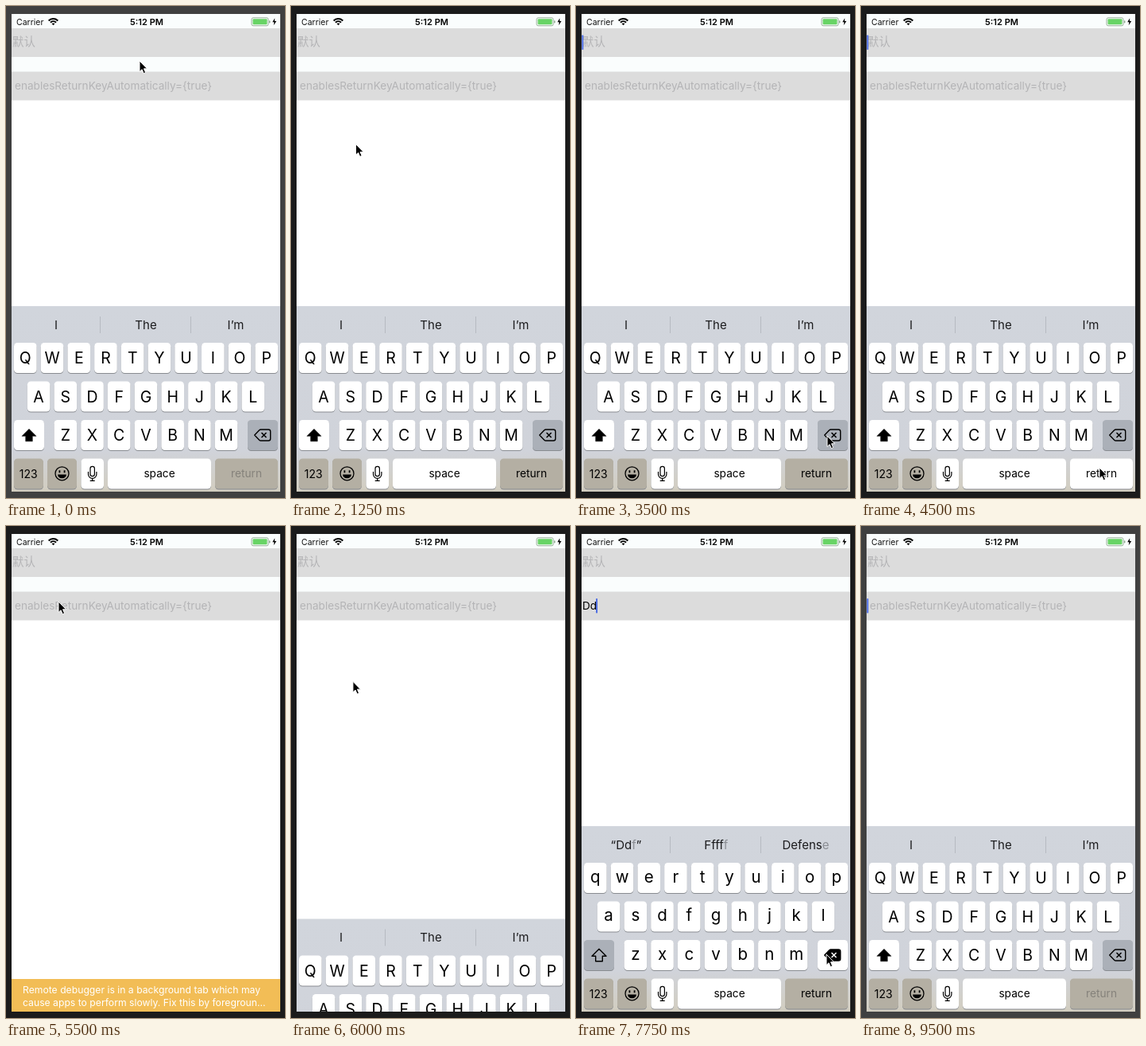
These frames come from a looping animation (351x618 px, 9750 ms). An HTML page with a canvas:

```html
<!DOCTYPE html>
<html>
<head>
<meta charset="utf-8">
<style>
html, body { margin: 0; width: 351px; height: 618px; overflow: hidden; }
canvas { display: block; }
</style>
</head>
<body>
<canvas id="stage" width="351" height="618"></canvas>
<script>
const ctx = document.getElementById('stage').getContext('2d');
const LOOP = 9750, STEP = 250, KEYBOARD_TOP = 377;
const FONT = "Inter, 'Noto Sans CJK SC', 'Noto Sans CJK JP', sans-serif";
const DEFAULT_WORDS = ['I', 'The', 'I’m'];

const initial = { active: false, focus: 2, text: '', press: '', words: DEFAULT_WORDS, fade: false };
const events = [
  [500, { active: true, focus: 1 }],
  [2500, { text: 'C' }],
  [2750, { words: ['“C”', 'Can', 'Come'] }],
  [3250, { text: '', press: 'delete', words: DEFAULT_WORDS }],
  [3500, { press: '' }],
  [4500, { press: 'return' }],
  [4750, { press: '', focus: 0 }],
  [5750, { focus: 2 }],
  [6750, { text: 'D' }],
  [7000, { words: ['“D”', 'Do', 'Don’t'] }],
  [7250, { text: 'Dd', words: ['“Dd”', 'Dad', 'Did'] }],
  [7500, { text: 'Ddf', words: ['“Ddf”', 'Fffff', 'Defense'] }],
  [7750, { text: 'Dd', press: 'delete', fade: true }],
  [8000, { text: 'D', words: ['“D”', 'Do', 'Don’t'], fade: false }],
  [8250, { text: '', words: DEFAULT_WORDS }],
  [8500, { press: '' }],
  [9250, { active: false }]
];

// Tracks hold [time, ...values].
const pointerTrack = [
  [0, 168, 69], [500, 60, 46], [1000, 60, 46], [1750, 143, 538], [2500, 146, 541], [2750, 146, 541],
  [3250, 316, 540], [3750, 316, 540], [4500, 300, 580], [4750, 300, 580], [5500, 66, 95],
  [5750, 66, 95], [6500, 112, 482], [7000, 112, 482], [7250, 143, 483], [7750, 315, 538],
  [8250, 315, 538], [8750, 322, 599], [9000, 324, 630], [9750, 324, 630]
];
const hiddenTrack = [[0, 0], [4500, 0], [5000, 1], [5750, 1], [6250, 0], [9750, 0]];

function sample(track, time) {
  const i = track.findIndex((key, n) => n && time <= key[0]);
  const [from, to] = [track[i - 1], track[i]];
  const p = (time - from[0]) / (to[0] - from[0]);
  const eased = p * p * (3 - 2 * p);
  return from.slice(1).map((v, n) => v + (to[n + 1] - v) * eased);
}

function box(x, y, w, h, color, radius = 0) {
  ctx.fillStyle = color;
  ctx.beginPath();
  ctx.roundRect(x, y, w, h, radius);
  ctx.fill();
}

function label(text, x, y, size, color = '#000', align = 'center', weight = 400) {
  ctx.font = `${weight} ${size}px ${FONT}`;
  ctx.textAlign = align;
  ctx.fillStyle = color;
  ctx.fillText(text, x, y);
}

function shape(path, x, y, fill, stroke, width = 1.4) {
  const p = new Path2D(path);
  ctx.save();
  ctx.translate(x, y);
  ctx.lineWidth = width;
  ctx.lineJoin = 'round';
  if (fill) { ctx.fillStyle = fill; ctx.fill(p); }
  if (stroke) { ctx.strokeStyle = stroke; ctx.stroke(p); }
  ctx.restore();
}

function key(x, y, w, color = '#fff') {
  box(x, y + 1, w, 38, '#898c91', 4.5);
  box(x, y, w, 38, color, 4.5);
}

function statusBar() {
  box(7, 10, 338, 18, '#fafdfd');
  label('Carrier', 13, 23.7, 10.5, '#111', 'left');
  label('5:12 PM', 177, 23.8, 11, '#000', 'center', 600);
  ctx.strokeStyle = '#000';
  ctx.lineWidth = 2;
  for (const r of [4.8, 8]) {
    ctx.beginPath();
    ctx.arc(59.5, 24, r, -Math.PI * 0.76, -Math.PI * 0.24);
    ctx.stroke();
  }
  shape('M0 0L-2 -2.2Q0 -3.6 2 -2.2Z', 59.5, 24.3, '#000');
  shape('M2 0H19Q21 0 21 2V8Q21 10 19 10H2Q0 10 0 8V2Q0 0 2 0Z', 309, 14.8, null, '#8fa890', 0.9);
  box(310.5, 16.3, 18, 7, '#68d465', 1);
  box(331, 18.3, 1.4, 3.2, '#8fa890', 1);
  shape('M3 0L0 5H2.2L1.5 9L5 3.7H2.7Z', 335.2, 15.2, '#000');
}

function field(id, top, placeholder, state, time) {
  const focused = state.focus === id;
  const text = focused ? state.text : '';
  box(7, top, 338, 36, '#dcdcdc');
  label(text || placeholder, text || id === 1 ? 8 : 11, top + 22.3,
    text || id === 2 ? 13.6 : 14.4, text ? '#000' : '#b4b4b6', 'left');
  const blinkOn = Math.floor(time / 500) % 2;
  if (focused && (text || blinkOn)) {
    const x = text ? 7.6 + ctx.measureText(text).width - 0.6 : 7.4;
    box(x, top + 8.5, 1.9, 18.5, '#4567e4', 0.8);
  }
}

function warning() {
  box(7, 569, 338, 41, '#f2bd56');
  label('Remote debugger is in a background tab which may', 21, 587.3, 12.2, '#fff', 'left');
  label('cause apps to perform slowly. Fix this by foregroun...', 21, 602.6, 12.2, '#fff', 'left');
}

function suggestions({ words, fade }) {
  words.forEach((word, i) => {
    const x = 63 + i * 113;
    if (!fade) return label(word, x, 405.5, 15, '#1c1c1e');
    // The changing last letter is dimmed.
    const cut = i ? word.length - 1 : word.length - 2;
    const parts = [word.slice(0, cut), word[cut], word.slice(cut + 1)];
    ctx.font = `400 15px ${FONT}`;
    let left = x - ctx.measureText(word).width / 2;
    parts.forEach((part, n) => {
      label(part, left, 405.5, 15, n === 1 ? '#8b8e94' : '#1c1c1e', 'left');
      left += ctx.measureText(part).width;
    });
  });
  box(118, 390, 1, 21, '#b6bac1');
  box(232, 390, 1, 21, '#b6bac1');
}

function letterKeys(caps) {
  [['QWERTYUIOP', 24.3, 423], ['ASDFGHJKL', 41.1, 471.5], ['ZXCVBNM', 74.8, 520]].forEach(([row, start, y]) => {
    [...row].forEach((letter, i) => {
      const x = start + i * 33.72;
      key(x - 14.3, y, 28.6);
      label(caps ? letter : letter.toLowerCase(), x, y + (caps ? 26.3 : 24.8), caps ? 19.5 : 20.5);
    });
  });
}

function functionKeys({ press, focus, text }, caps) {
  const gray = '#abb0b8', warm = '#b4afa3';
  key(10, 520, 38, caps ? '#fff' : gray);
  shape('M0 -8L9 1H4.3V7.5H-4.3V1H-9Z', 29, 539.3, caps && '#000', '#000', caps ? 0.5 : 1.4);

  const deleting = press === 'delete';
  key(304, 520, 38, deleting ? '#fff' : gray);
  shape('M-10 0L-4 -6.2Q-3.3 -7 -2 -7H7.5Q10 -7 10 -4.5V4.5Q10 7 7.5 7H-2Q-3.3 7 -4 6.2Z', 322.7, 539, deleting && '#000', '#000');
  shape('M-1.2 -3L4.8 3M4.8 -3L-1.2 3', 322.7, 539, null, deleting ? '#fff' : '#000', 1.5);

  key(10, 568.5, 37, warm);
  label('123', 28.3, 592.6, 14);
  key(52, 568.5, 37, warm);
  shape('M8.5 0A8.5 8.5 0 1 1 -8.5 0A8.5 8.5 0 1 1 8.5 0Z', 70.5, 587.3, null, '#000', 1.3);
  shape('M-5.5 1.3H5.5Q4.8 6 0 6Q-4.8 6 -5.5 1.3ZM-4 -4H-2.2V-1H-4ZM2.2 -4H4V-1H2.2Z', 70.5, 587.3, '#000');
  key(94.5, 568.5, 28.5);
  shape('M-2.7 -6A2.7 2.7 0 0 1 2.7 -6V1A2.7 2.7 0 0 1 -2.7 1ZM-5.2 -2V1.2A5.2 5.2 0 0 0 5.2 1.2V-2M0 6.4V9.3M-3 9.3H3', 108.7, 587, null, '#000', 1.2);
  key(128, 568.5, 130);
  label('space', 193, 592.2, 13.7);
  key(263, 568.5, 79, press === 'return' ? '#fff' : warm);
  label('return', 302.5, 592.2, 13.7, focus === 1 || text ? '#000' : '#85827b');
}

function keyboard(state, hidden) {
  if (hidden >= 1) return;
  const caps = !state.text;
  ctx.save();
  ctx.translate(0, hidden * (610 - KEYBOARD_TOP));
  const shade = ctx.createLinearGradient(0, KEYBOARD_TOP, 0, 610);
  shade.addColorStop(0, '#d1d5dc');
  shade.addColorStop(0.78, '#d0d3da');
  shade.addColorStop(0.9, '#d1d0cc');
  shade.addColorStop(1, '#d2cdbf');
  box(7, KEYBOARD_TOP, 338, 233, shade);
  suggestions(state);
  letterKeys(caps);
  functionKeys(state, caps);
  ctx.restore();
}

function draw(time) {
  const state = Object.assign({}, initial, ...events.filter(e => e[0] <= time).map(e => e[1]));
  box(0, 0, 351, 618, state.active ? '#1b1b1b' : '#404040');
  ctx.save();
  ctx.beginPath();
  ctx.rect(7, 10, 338, 600);
  ctx.clip();
  box(7, 10, 338, 600, '#fff');
  statusBar();
  field(1, 28, '默认', state, time);
  box(7, 64, 338, 19, '#fafdfd');
  field(2, 82.5, 'enablesReturnKeyAutomatically={true}', state, time);
  warning();
  keyboard(state, sample(hiddenTrack, time)[0]);
  ctx.restore();
  const [x, y] = sample(pointerTrack, time);
  shape('M0 0V13.5L3.1 10.7L5.2 15.7L7.6 14.6L5.5 9.8H9.6Z', x, y, '#000', '#fff', 1);
}

function tick() {
  const time = performance.now() % LOOP;
  draw(Math.floor(time / STEP) * STEP);
  requestAnimationFrame(tick);
}
tick();
</script>
</body>
</html>
```
